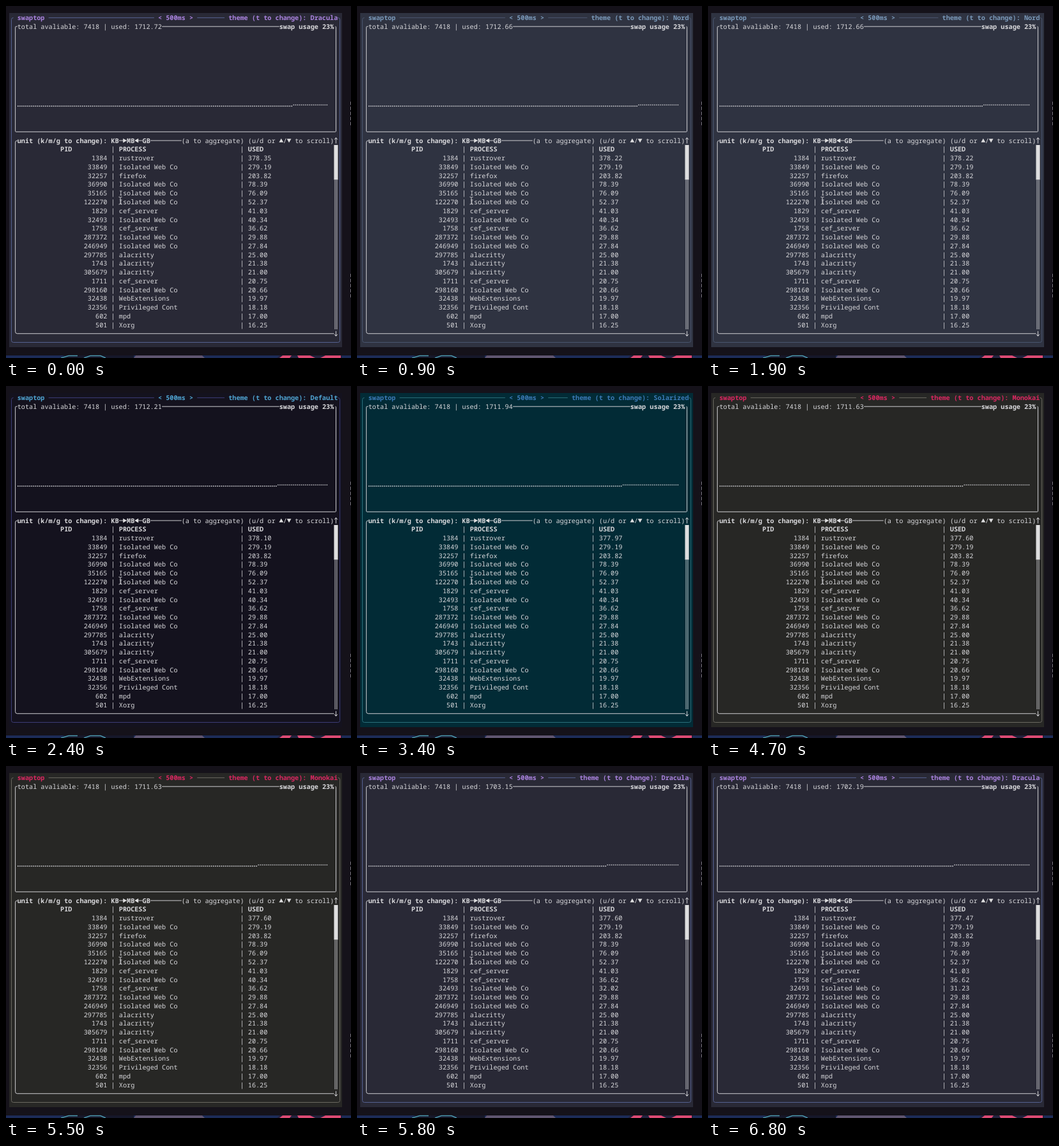
Recreate the animation shown at these times as an HTML page. Size 540 by 552 pixels, loop 6.9 s.

```html
<!DOCTYPE html>
<html lang="en">
<head>
<meta charset="utf-8">
<title>swaptop</title>
<style>
  html, body { margin: 0; width: 100%; height: 100%; overflow: hidden; background: #15121a; }
  svg { display: block; width: 540px; height: 552px; }
  text {
    font: 10.2px "Noto Sans Mono", "DejaVu Sans Mono", monospace;
    fill: #d9d9dc; white-space: pre; text-rendering: geometricPrecision;
  }
  .bold { font-weight: 700; }
  .accent { fill: var(--accent); }
  .line { fill: none; stroke: #cfcfd3; }
  .frame { fill: none; stroke: var(--frame); }
  .solid { fill: #dededf; }
  .dots { fill: none; stroke: #d4d4d8; stroke-width: 1.3; stroke-dasharray: 1.7 1.36; }
  #window { fill: var(--bg); }
  [data-theme=Dracula]   { --bg: #292936; --accent: #ab83e0; --frame: #566292; }
  [data-theme=Nord]      { --bg: #2f3341; --accent: #7b9abb; --frame: #4a566f; }
  [data-theme=Default]   { --bg: #14121e; --accent: #50a5d3; --frame: #3d3d78; }
  [data-theme=Solarized] { --bg: #022b36; --accent: #3c7bb8; --frame: #2b707c; }
  [data-theme=Monokai]   { --bg: #272725; --accent: #dc2762; --frame: #6b6961; }
</style>
</head>
<body>
<svg id="stage" viewBox="0 0 540 552" data-theme="Dracula">
  <rect id="window" x="5" y="11" width="521" height="524"/>
  <g id="desktop">
    <rect y="548" width="540" height="4" fill="#1c2c58"/>
    <path d="M84 552l8-4h108v4z" fill="#16182a"/>
    <path d="M86 552l12-3.5h14M122 552l10-3.5h16l8 3.5" fill="none" stroke="#4d9db3" stroke-width="1.4"/>
    <path d="M200 552l3-4h104l4 4z" fill="#5f5570"/>
    <path d="M424 552l4-4h98v4z" fill="#24223f"/>
    <path d="M428 552l5-4h14l-3 4zM458 552l-2-4h20l8 4zM492 552l8-4h24v4z" fill="#dc4a74"/>
    <path d="M539.5 150v38M539.5 420v40" stroke="#77747c" stroke-dasharray="5 3"/>
  </g>
</svg>
<script>
const LOOP = 6900, CELL = 6.12, ROW = 13.76;
const stage = document.getElementById('stage');
const colX = c => 5.46 + CELL * c;
const midX = c => colX(c + 0.5);
const rowY = r => 18.4 + ROW * r;

function add(tag, attrs) {
  const el = document.createElementNS('http://www.w3.org/2000/svg', tag);
  for (const key in attrs) el.setAttribute(key, attrs[key]);
  return stage.appendChild(el);
}
function put(col, row, str, cls = '') {
  const el = add('text', { x: colX(col), y: rowY(row) + 3.65, class: cls });
  el.textContent = str;
  return el;
}
const path = (d, cls) => add('path', { d, class: cls });

// Box outline that leaves its top edge open for titles
function openBox(left, top, right, bottom, radius, cls) {
  const x1 = midX(left), x2 = midX(right), y1 = rowY(top), y2 = rowY(bottom), r = radius;
  path(`M${x1 + 3} ${y1}h${r - 3}q${-r} 0 ${-r} ${r}V${y2 - r}q0 ${r} ${r} ${r}H${x2 - r}` +
       `q${r} 0 ${r} ${-r}V${y1 + r}q0 ${-r} ${-r} ${-r}`, cls);
}
function triangle(col, row, angle) {
  add('path', {
    d: 'M-2.8 -3.4L3.2 0L-2.8 3.4z', class: 'solid',
    transform: `translate(${midX(col)} ${rowY(row)}) rotate(${angle})`
  });
}
const rule = (from, to, row, cls = 'line') => path(`M${colX(from)} ${rowY(row)}H${colX(to)}`, cls);

// Outer frame
openBox(0, 0, 84, 37, 3, 'frame');
put(2, 0, 'swaptop', 'bold accent');
rule(10, 37, 0, 'frame');
put(38, 0, '< 500ms >', 'bold accent');
const themeRule = rule(48, 55, 0, 'frame');
const themeText = put(56, 0, '', 'bold accent');

// Usage chart
openBox(1, 1, 83, 13, 1, 'line');
const totalText = put(2, 1, '');
rule(39, 69, 1);
put(69, 1, 'swap usage 23%', 'bold');
const highDots = path('', 'dots'), lowDots = path('', 'dots');

// Process table
const tableX = midX(1), tableTop = rowY(14), tableEnd = rowY(36);
path(`M${tableX + 3} ${tableTop}q-3 0 -3 3V${tableEnd - 3}q0 3 3 3H${colX(83)}`, 'line');
put(2, 14, 'unit (k/m/g to change): KB', 'bold');
rule(28, 29.2, 14);
triangle(29, 14, 0);
put(30, 14, 'MB', 'bold');
triangle(32, 14, 180);
rule(32.8, 34, 14);
put(34, 14, 'GB', 'bold');
rule(36, 44, 14);
put(44, 14, '(a to aggregate)');
put(61, 14, '(u/d or');
triangle(69, 14, -90);
put(70, 14, '/');
triangle(71, 14, 90);
put(73, 14, 'to scroll)');

// Scrollbar
const barX = midX(83);
path(`M${barX} ${tableTop + 4.5}v-9m-2.5 3l2.5 -3l2.5 3` +
     `M${barX} ${tableEnd - 4}v8m-2.5 -3l2.5 3l2.5 -3`, 'line');
path(`M${barX - 1.4} 273V507M${barX + 1.4} 273V507`, 'line');
add('rect', { x: colX(83), y: 218, width: CELL, height: 54.5, class: 'solid' });

put(13, 15, 'PID', 'bold');
put(28, 15, 'PROCESS', 'bold');
put(61, 15, 'USED', 'bold');

const WEB = 'Isolated Web Co', TERM = 'alacritty', CEF = 'cef_server';
const processes = [
  [1384, 'rustrover', 378.35], [33849, WEB, 279.19], [32257, 'firefox', 203.82],
  [36990, WEB, 78.39], [35165, WEB, 76.09], [122270, WEB, 52.37], [1829, CEF, 41.03],
  [32493, WEB, 40.34], [1758, CEF, 36.62], [287372, WEB, 29.88], [246949, WEB, 27.84],
  [297785, TERM, 25], [1743, TERM, 21.38], [305679, TERM, 21], [1711, CEF, 20.75],
  [298160, WEB, 20.66], [32438, 'WebExtensions', 19.97], [32356, 'Privileged Cont', 18.18],
  [602, 'mpd', 17], [501, 'Xorg', 16.25]
];
const lines = processes.map((_, i) => {
  const row = 16 + i;
  return [put(19, row, ''), put(28, row, ''), put(61, row, '')];
});
for (let row = 15; row < 36; row++) [26, 59].forEach(col => put(col, row, '|'));

// Text pointer
path('M176.5 299.5q2 0 2.5 1q.5 -1 2.5 -1M179 300.5V310M176.5 311q2 0 2.5 -1q.5 1 2.5 1', 'line');

// start ms, theme, total used, pid 1384, pid 32493
const states = [
  [0, 'Dracula', 1712.72, 378.35, 40.34],
  [800, 'Nord', 1712.66, 378.22, 40.34],
  [2300, 'Default', 1712.21, 378.10, 40.34],
  [3300, 'Solarized', 1711.94, 377.97, 40.34],
  [4600, 'Monokai', 1711.63, 377.60, 40.34],
  [5700, 'Dracula', 1703.15, 377.60, 32.02],
  [6500, 'Dracula', 1702.19, 377.47, 31.23]
];

function showState([, theme, total, ide, web]) {
  stage.dataset.theme = theme;
  const label = 'theme (t to change): ' + theme;
  const col = 84 - label.length;
  themeText.textContent = label;
  themeText.setAttribute('x', colX(col));
  themeRule.setAttribute('d', `M${colX(48)} ${rowY(0)}H${colX(col - 1)}`);
  totalText.textContent = 'total avaliable: 7418 | used: ' + total.toFixed(2);

  const live = { 1384: ide, 32493: web };
  processes
    .map(([pid, name, used]) => [pid, name, live[pid] ?? used])
    .sort((a, b) => b[2] - a[2])
    .forEach(([pid, name, used], i) => {
      const [pidText, nameText, usedText] = lines[i];
      pidText.textContent = String(pid).padStart(6);
      nameText.textContent = name;
      usedText.textContent = used.toFixed(2);
    });
}

// The chart scrolls left by one dot per refresh; refreshes slow down near the end
function showChart(shift) {
  const start = 18, pitch = CELL / 2, split = start + (141 - shift) * pitch;
  lowDots.setAttribute('d', `M${start} 157H${split - 0.5}`);
  highDots.setAttribute('d', `M${split} 155.2H503.5`);
}

let shownState, shownShift;
function draw() {
  const t = performance.now() % LOOP;
  const state = states.findLast(s => s[0] <= t);
  const shift = Math.min(Math.floor((t + 100) / 300), 19 + Math.floor(Math.max(0, t - 5500) / 500));
  if (state !== shownState) showState(shownState = state);
  if (shift !== shownShift) showChart(shownShift = shift);
  requestAnimationFrame(draw);
}
draw();
</script>
</body>
</html>
```
